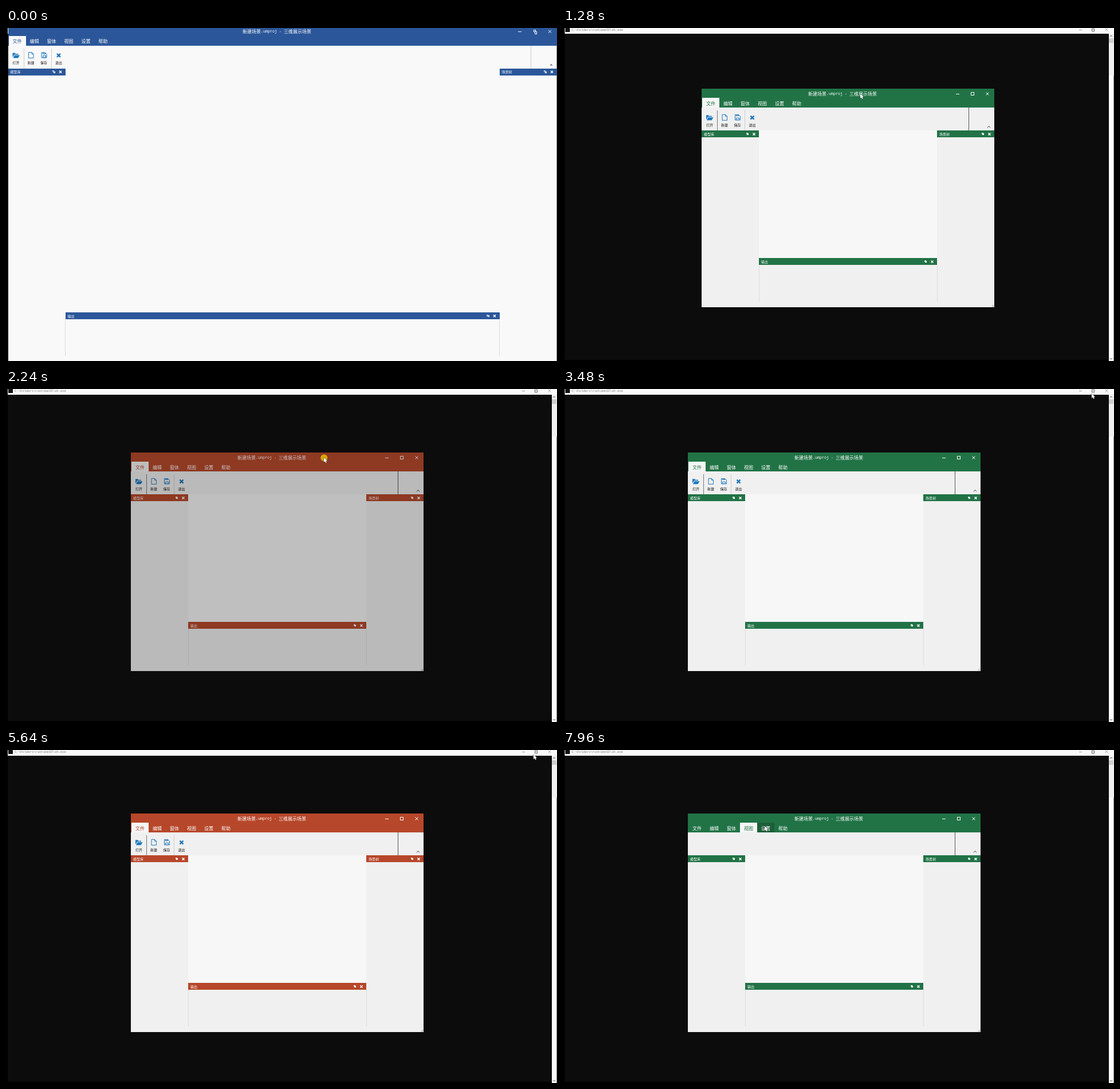
An HTML page with a canvas for the animation above (8 s loop, 962x582 px).

```html
<!DOCTYPE html>
<html lang="zh">
<head>
<meta charset="utf-8">
<style>
  html, body { margin: 0; width: 100%; height: 100%; overflow: hidden; background: #000; }
  canvas { display: block; }
</style>
</head>
<body>
<canvas id="stage" width="962" height="582"></canvas>
<script>
const LOOP = 8000, WIDTH = 962, HEIGHT = 582;
const stage = document.getElementById('stage').getContext('2d');
const layer = document.createElement('canvas');
layer.width = WIDTH;
layer.height = HEIGHT;
const ui = layer.getContext('2d');

const BLUE = [43, 87, 154], RED = [183, 71, 42], GREEN = [33, 115, 70];
const FADE = 280;
const THEMES = [[-FADE, BLUE], [100, RED], [930, GREEN], [1760, RED], [2540, GREEN], [3490, BLUE],
  [4280, GREEN], [5120, RED], [5940, BLUE], [6860, RED], [7740, GREEN]];
const MAXIMIZED = [[0, 560], [1340, 1800], [2440, 3470], [4270, 5110]];
const DRAGS = [[560, 1240], [1710, 2320]];
const TABS = ['文件', '编辑', '窗体', '视图', '设置', '帮助'];
const CURSOR = [[120, 519, -20], [360, 519, 8], [560, 519, 8], [760, 518, 94], [960, 519, 115],
  [1380, 519, 115], [1560, 519, 7], [1760, 519, 7], [2160, 555, 120], [2560, 555, 120],
  [2860, 924, 6], [3080, 924, 7], [3120, 923, 8], [3560, 923, 8], [3880, 689, 115],
  [4080, 689, 115], [4120, 690, 116], [4560, 690, 116], [4960, 921, 8], [5680, 921, 8],
  [6320, 262, 133], [6920, 262, 133], [7160, 322, 133], [7440, 322, 133], [7600, 352, 133]];

const mix = (a, b, k) => a + (b - a) * k;
const within = (t, spans) => spans.some(([from, to]) => t >= from && t < to);
const rgb = (color, shade = 1) => `rgb(${color.map(v => Math.round(v * shade))})`;

function themeAt(t) {
  const i = THEMES.findLastIndex(([start]) => t >= start);
  const [start, color] = THEMES[i];
  if (i === 0) return color;
  const k = 1 - (1 - Math.min(1, (t - start) / FADE)) ** 4;
  return THEMES[i - 1][1].map((v, n) => mix(v, color[n], k));
}

function cursorAt(t) {
  const i = CURSOR.findIndex(key => key[0] > t);
  if (i === 0) return { x: 519, y: -20 };
  if (i < 0) return { x: 352, y: 133 };
  const [t0, x0, y0] = CURSOR[i - 1], [t1, x1, y1] = CURSOR[i];
  const k = (t - t0) / (t1 - t0), eased = k * k * (3 - 2 * k);
  return { x: Math.round(mix(x0, x1, eased)), y: Math.round(mix(y0, y1, eased)) };
}

function boundsAt(t) {
  if (within(t, MAXIMIZED)) return { x: 3.5, y: -2.5, w: 958, h: 585.5, max: true };
  const { x, y } = cursorAt(Math.min(t, t < 1340 ? 1240 : 2320));
  return { x: x - (t < 1340 ? 277 : 337), y: y - 9 + 0.3, w: 511, h: 382, max: false };
}

// Fills a rectangle whose edges are snapped to whole pixels.
function rect(c, x, y, w, h, color) {
  const left = Math.round(x), top = Math.round(y);
  c.fillStyle = color;
  c.fillRect(left, top, Math.round(x + w) - left, Math.round(y + h) - top);
}

function path(c, points, stroke, width = 1) {
  c.beginPath();
  points.forEach(([x, y]) => c.lineTo(x, y));
  if (stroke) {
    c.strokeStyle = stroke;
    c.lineWidth = width;
    c.stroke();
  } else {
    c.fill();
  }
}

function label(c, text, x, y, size, color, align = 'center', family = '"Noto Sans CJK SC", "Noto Sans CJK"') {
  c.font = `${size}px ${family}, sans-serif`;
  c.textAlign = align;
  c.textBaseline = 'middle';
  c.fillStyle = color;
  c.fillText(text, x, y);
}

function cross(c, x, y, r, color, width) {
  path(c, [[x - r, y - r], [x + r, y + r]], color, width);
  path(c, [[x + r, y - r], [x - r, y + r]], color, width);
}

function box(c, x, y, w, h, color) {
  c.strokeStyle = color;
  c.lineWidth = 1;
  c.strokeRect(Math.floor(x) + 0.5, Math.floor(y) + 0.5, w, h);
}

function drawConsole() {
  const c = stage;
  rect(c, 0, 0, WIDTH, HEIGHT, '#000');
  rect(c, 3, 0, 959, 10, '#fafafa');
  rect(c, 3, 10, 950, 570, '#0c0c0c');
  rect(c, 4, 0, 8, 7, '#111');
  label(c, 'C:\\Folders\\runtime32\\sh.exe', 15, 4, 5.55, '#777', 'left', '"Liberation Mono"');
  rect(c, 901, 3, 5, 1, '#999');
  box(c, 923, 1, 4, 4, '#666');
  cross(c, 949, 3, 2.5, '#999', 0.8);
  rect(c, 953, 10, 9, 73, '#f0f0f0');
  rect(c, 953, 83, 8, 499, '#fcfcfc');
  rect(c, 961, 83, 1, 499, '#888');
  rect(c, 953, 18, 8, 8, '#cdcdcd');
  path(c, [[955, 15], [957, 13], [959, 15]], '#555');
  path(c, [[955, 577], [957, 579], [959, 577]], '#555');
}

function drawDockBar(x, y, w, text, accent) {
  rect(ui, x, y, w, 12, accent);
  label(ui, text, x + 4, y + 6.3, 6, '#fff', 'left');
  const right = x + w;
  box(ui, right - 22, y + 4, 2, 2, '#ffffffb0');
  box(ui, right - 20.5, y + 5.5, 2, 2, '#fff');
  cross(ui, right - 8.5, y + 6.2, 2, '#fff', 1.5);
}

function drawFileRibbon(x, y, max) {
  const blue = '#1f78bd';
  ui.fillStyle = blue;
  path(ui, [[x + 8, y + 54], [x + 8, y + 46], [x + 12, y + 46], [x + 13, y + 47.5], [x + 18, y + 47.5],
    [x + 18, y + 49], [x + 11, y + 49]]);
  path(ui, [[x + 9, y + 55], [x + 11.5, y + 50], [x + 20.5, y + 50], [x + 17.5, y + 55]]);
  path(ui, [[x + 36, y + 45], [x + 41.5, y + 45], [x + 44.5, y + 48], [x + 44.5, y + 55],
    [x + 36, y + 55], [x + 36, y + 45]], blue);
  path(ui, [[x + 41.5, y + 45], [x + 41.5, y + 48], [x + 44.5, y + 48]], blue);
  path(ui, [[x + 58.5, y + 45.5], [x + 65, y + 45.5], [x + 67.5, y + 48], [x + 67.5, y + 54.5],
    [x + 58.5, y + 54.5], [x + 58.5, y + 45]], blue);
  box(ui, x + 60.5, y + 45.5, 4, 2, blue);
  box(ui, x + 60.5, y + 51, 5, 3, blue);
  cross(ui, x + 88.5, y + 50.3, 3, blue, 2.4);
  [['打开', 14], ['新建', 40], ['保存', 62.5], ['退出', 88.5]]
    .forEach(([text, dx]) => label(ui, text, x + dx, y + 63, 6, '#111'));
  rect(ui, x + 27, y + 38, 1, 35, max ? '#ccc' : '#777');
  rect(ui, x + 75, y + 38, 1, 35, '#ccc');
}

function drawWindow(t, { x, y, w, h, max }, cursor) {
  const color = themeAt(t), accent = rgb(color);
  const right = x + w, bottom = y + h;
  const flat = t < 560;
  const pane = flat ? '#f9f9f9' : '#f0f0f0';
  ui.clearRect(0, 0, WIDTH, HEIGHT);
  rect(ui, x, y, w, h, pane);
  rect(ui, x + 100, y + 73, w - 200, h - 159, flat ? '#f9f9f9' : '#f7f7f7');
  if (max) rect(ui, right - 1, y + 33, 1, h - 33, '#888');
  rect(ui, x, y, w, 33, accent);

  const left = Math.round(x + w / 2 - 69.5), titleY = y + 8.7;
  label(ui, '新建场景', left, titleY, 8, '#fff', 'left');
  label(ui, '.umproj - ', left + 32, titleY, 6.67, '#fff', 'left', '"Liberation Mono"');
  label(ui, '三维展示场景', left + 72, titleY, 8, '#fff', 'left');

  rect(ui, right - 67.5, y + 8.5, 6, 1, '#fff');
  if (max) {
    box(ui, right - 40.5, y + 6, 3, 3, '#fff');
    box(ui, right - 38, y + 8.5, 3, 4, '#fff');
  } else {
    box(ui, right - 41, y + 6, 5, 5, '#fff');
  }
  cross(ui, right - 12, y + 8.7, 2.5, '#fff', 1);

  const selected = t < 6520 ? 0 : t < 7240 ? 1 : 3;
  TABS.forEach((text, i) => {
    const tabX = x + 1 + i * 30, tabY = y + 16;
    const hovered = cursor.x >= tabX && cursor.x < tabX + 30 && cursor.y >= tabY && cursor.y < tabY + 17;
    if (i === selected) rect(ui, tabX, tabY, 30, 17, flat ? '#f9f9f9' : '#f5f5f5');
    else if (hovered) rect(ui, tabX, tabY, 30, 17, rgb(color, 0.83));
    label(ui, text, tabX + 15, y + 25.2, 8, i === selected ? accent : '#fff');
  });

  if (selected === 0) drawFileRibbon(x, y, max);
  rect(ui, Math.floor(right - 45), y + 33, 1, 40, max ? '#ccc' : '#555');
  const caretX = right - 9.5, caret = [[caretX - 2.5, y + 68], [caretX, y + 65], [caretX + 2.5, y + 68]];
  ui.fillStyle = '#777';
  path(ui, caret, max ? null : '#444');

  drawDockBar(x, y + 73, 100, '模型库', accent);
  drawDockBar(right - 100, y + 73, 100, '场景树', accent);
  drawDockBar(x + 100, bottom - 86, w - 200, '输出', accent);
  rect(ui, Math.floor(x + 100), bottom - 74, 1, 64, '#ddd');
  rect(ui, Math.floor(right - 100), bottom - 74, 1, 64, '#ddd');
  if (!max) {
    ui.fillStyle = '#bbb';
    path(ui, [[right - 1, bottom - 5], [right - 1, bottom - 1], [right - 5, bottom - 1]]);
  }
}

function drawCursor({ x, y }, pressed) {
  if (pressed) {
    stage.fillStyle = 'rgba(255, 225, 0, .65)';
    stage.beginPath();
    stage.arc(x + 0.3, y + 0.3, 6, 0, Math.PI * 2);
    stage.fill();
  }
  const outline = [[0, 0], [0, 8], [2, 6.3], [3.3, 9.2], [4.7, 8.6], [3.5, 5.8], [6, 5.7], [0, 0]]
    .map(([dx, dy]) => [x + dx, y + dy]);
  path(stage, outline, '#222', 0.8);
  stage.fillStyle = '#fff';
  path(stage, outline);
}

function draw(now) {
  const t = now % LOOP;
  const cursor = cursorAt(t), dragging = within(t, DRAGS);
  drawConsole();
  drawWindow(t, boundsAt(t), cursor);
  stage.globalAlpha = dragging ? 0.765 : 1;
  stage.drawImage(layer, 0, 0);
  stage.globalAlpha = 1;
  drawCursor(cursor, dragging);
}

const begin = performance.now();
function tick() {
  draw(performance.now() - begin);
  requestAnimationFrame(tick);
}
tick();
</script>
</body>
</html>
```
